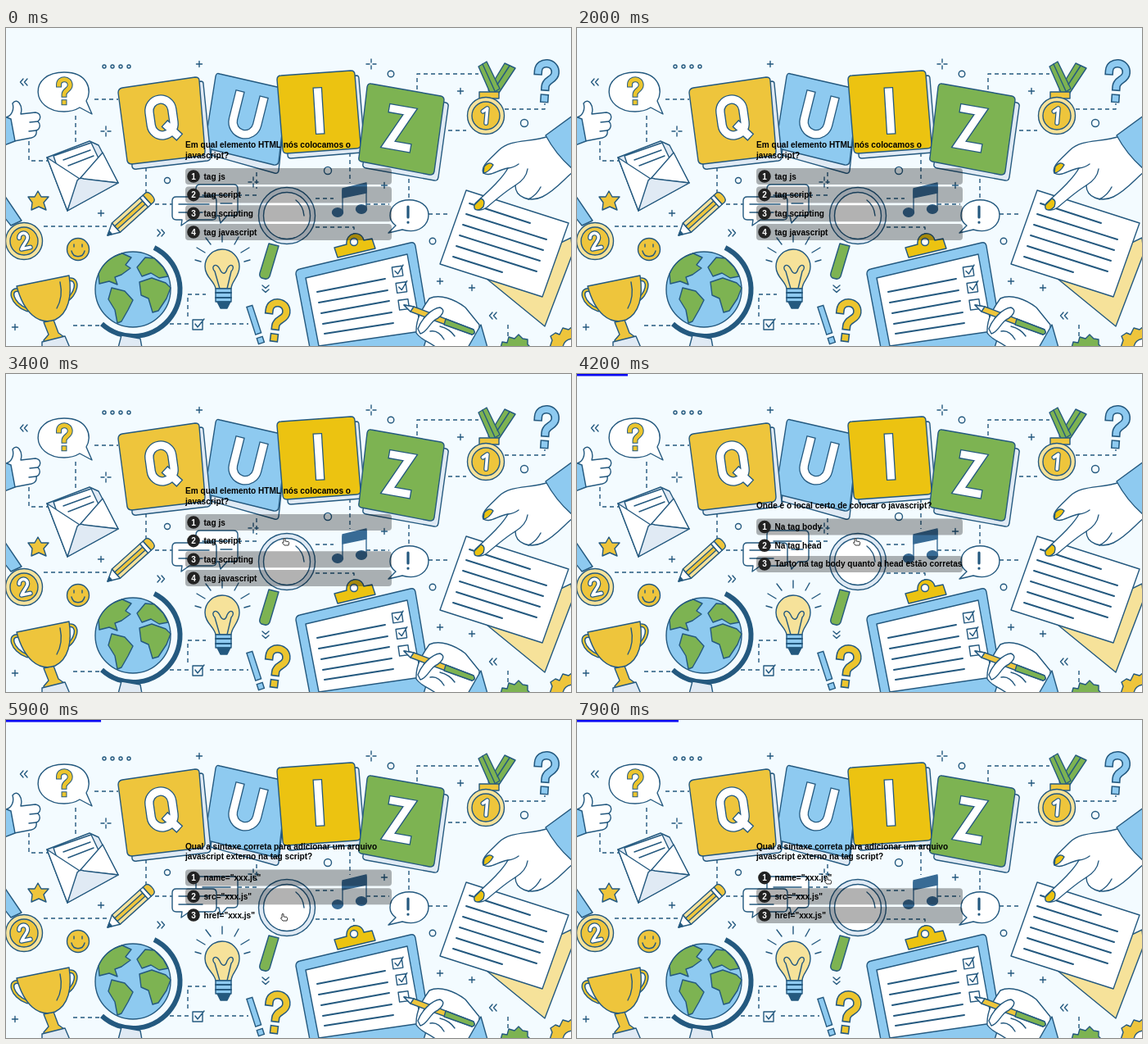
An HTML page that plays this animation: 690x388 px, repeating every 8000 ms.

```html
<!DOCTYPE html>
<html lang="pt">
<head>
<meta charset="utf-8">
<title>Quiz</title>
<style>
html, body { margin: 0; width: 100%; height: 100%; overflow: hidden; background: #f3fbff; }
svg { display: block; width: 690px; height: 388px; overflow: hidden; }
.art { fill: none; stroke: #24597f; stroke-width: 1.4; stroke-linejoin: round; stroke-linecap: round; }
.y { fill: #eec53c; } .p { fill: #f6e29a; } .b { fill: #8ecaf0; }
.g { fill: #7db352; } .w { fill: #fff; } .s { fill: #e0eaf4; }
.k { fill: #24597f; }
.gold { fill: #ecc311; }
.dash { stroke-dasharray: 5 4; stroke-linecap: butt; }
.rule { stroke-width: 1.9; }
.in { stroke: #fff; } .in.yel { stroke: #ecc52e; } .in.blu { stroke: #8ecaf0; }
.letter use, .mark use { stroke-linecap: square; stroke-linejoin: miter; }
.letter use { stroke-width: 11.6; } .letter .in { stroke-width: 9; }
.mark use { stroke-width: 9.6; } .mark .in { stroke-width: 6.8; }
.digit { stroke-width: 6; } .digit.in { stroke-width: 3.6; }
.quiz { font: bold 10.08px "Liberation Sans", Arial, sans-serif; }
.quiz rect { width: 252px; height: 20px; rx: 4px; fill: #000; fill-opacity: .3; animation: 8s step-end infinite; }
.quiz circle { cx: 10px; cy: 10px; r: 7.8px; fill: #222; }
.n { fill: #fff; text-anchor: middle; }
.quiz > g { animation: 8s step-end infinite; }
#q1 { animation-name: q1; } #q2 { animation-name: q2; } #q3 { animation-name: q3; }
#bar { fill: #0808f4; transform-origin: 0 0; animation: bar 8s infinite; }
#hand { animation: hand 8s linear infinite; }
@keyframes q1 { 0% { visibility: visible } 44.375%, 100% { visibility: hidden } }
@keyframes q2 { 0% { visibility: hidden } 44.375% { visibility: visible } 69.375%, 100% { visibility: hidden } }
@keyframes q3 { 0% { visibility: hidden } 69.375%, 100% { visibility: visible } }
@keyframes bar {
  0%, 44.375% { transform: scaleX(0); animation-timing-function: ease }
  51.875%, 69.375% { transform: scaleX(.5); animation-timing-function: ease }
  76.875%, 100% { transform: scaleX(1) }
}
@keyframes hand {
  0%, 36.25% { transform: translate(400px, 392px) }
  41.25%, 55.625% { transform: translate(340px, 200px) }
  57.5%, 92.5% { transform: translate(338px, 236px) }
  96.25%, 100% { transform: translate(305px, 191px) }
}
/* rows turn clear while the pointer is over them */
@keyframes q1r4 { 39.69% { fill-opacity: 0 } 40.19% { fill-opacity: .3 } }
@keyframes q1r3 { 40.19% { fill-opacity: 0 } 40.88% { fill-opacity: .3 } }
@keyframes q1r2 { 40.88%, 100% { fill-opacity: 0 } }
@keyframes q2r2 { 0% { fill-opacity: 0 } 56.625%, 100% { fill-opacity: .3 } }
@keyframes q2r3 { 56.625%, 100% { fill-opacity: 0 } }
@keyframes q3r3 { 0% { fill-opacity: 0 } 93.25%, 100% { fill-opacity: .3 } }
@keyframes q3r2 { 93.25% { fill-opacity: 0 } 95.125%, 100% { fill-opacity: .3 } }
@keyframes q3r1 { 95.125%, 100% { fill-opacity: 0 } }
</style>
</head>
<body>
<svg viewBox="0 0 690 388">
<defs>
  <path id="ask" d="M-9-11C-9-23 10-23 10-10C10-2 0-2 0 6M0 19v.1"/>
  <path id="Q" d="M-14-8A14 14 0 0 1 14-8V8A14 14 0 0 1-14 8ZM6 12L15 23"/>
  <path id="U" d="M-15-22V8A15 15 0 0 0 15 8V-22"/>
  <path id="I" d="M0-23V23"/>
  <path id="Z" d="M-11-22H10L-10 22H13"/>
  <path id="plus" d="M-3.5 0h7M0-3.5v7"/>
  <path id="spark" d="M-6 0h4M2 0h4M0-6v4M0 2v4"/>
  <path id="chev" d="M0-4L-3.5 0L0 4M5-4L1.5 0L5 4"/>
  <path id="tick" d="M-6-6H6V6H-6ZM-3-1L0 3L8-7"/>
  <path id="one" d="M-4-5L1-9V9"/>
  <path id="two" d="M-5-5C-4-12 7-11 5-3C4 1-2 4-5 9H6"/>
</defs>

<g class="art">
  <!-- connectors -->
  <path class="dash" d="M108 87H137M85 107V142M28 138V162H56M171 170V204M502 84V56H577M540 125H562M609 99H658V92
    M46 242H124M182 215H203M222 352V325H244M82 363H114M283 204H308M378 208H400M378 243H425V252M440 215H468
    M492 184V208M516 227H541M249 361H296M200 361H226M306 176V196M420 152V189M613 362V378"/>
  <g>
    <circle cx="120" cy="47" r="2"/><circle cx="130" cy="47" r="2"/><circle cx="140" cy="47" r="2"/><circle cx="150" cy="47" r="2"/>
    <circle cx="470" cy="56" r="3.8"/><circle cx="633" cy="116" r="4.5"/><circle cx="393" cy="174" r="4.5"/>
    <circle cx="197" cy="186" r="3.5"/><circle cx="521" cy="260" r="3.8"/>
    <use href="#plus" x="236" y="44"/><use href="#plus" x="555" y="77"/><use href="#plus" x="116" y="226"/>
    <use href="#plus" x="462" y="192"/><use href="#plus" x="530" y="309"/><use href="#plus" x="569" y="317"/><use href="#plus" x="11" y="365"/>
    <use href="#spark" x="446" y="44"/><use href="#spark" x="122" y="126"/><use href="#spark" x="302" y="188"/>
    <use href="#chev" x="21" y="66"/><use href="#chev" x="594" y="351"/>
    <use href="#chev" transform="translate(190 250) rotate(180)"/><use href="#chev" transform="translate(317 319) rotate(-90)"/>
  </g>

  <!-- letter tiles -->
  <path class="s" d="M262 61L343 81L333 174Q332 178 328 177L250 155Z"/>
  <path class="b" d="M261 56Q257 54 256 59L243 141Q242 146 246 147L327 167Q332 168 333 163L343 78Q343 75 340 74Z"/>
  <g class="letter" transform="translate(294 107) rotate(14)"><use href="#U"/><use href="#U" class="in"/></g>
  <path class="s" d="M150 80L238 65Q241 65 241 68L250 157Q250 161 246 162L160 172Q155 173 154 169Z"/>
  <path class="y" d="M142 73L231 60Q236 60 236 64L243 150Q243 155 239 156L154 166Q149 166 148 162L137 79Q137 74 142 73Z"/>
  <g class="letter" transform="translate(190 109) rotate(-8)"><use href="#Q"/><use href="#Q" class="in"/></g>
  <path class="s" d="M342 64L428 58Q431 58 431 62L438 148Q438 152 434 152L348 159Q344 159 344 155Z"/>
  <path class="gold" d="M336 58L421 52Q426 52 426 57L433 142Q433 147 428 147L343 153Q338 153 338 148L331 63Q331 58 336 58Z"/>
  <g class="letter" transform="translate(382 101) rotate(-3.5)"><use href="#I"/><use href="#I" class="in"/></g>
  <path class="s" d="M447 73L537 91Q541 92 540 96L528 182Q527 187 523 186L440 171Q435 170 436 166Z"/>
  <path class="g" d="M446 68L531 83Q535 84 535 88L523 175Q522 180 517 179L434 163Q430 162 431 158L441 72Q442 67 446 68Z"/>
  <g class="letter" transform="translate(480 122) rotate(10)"><use href="#Z"/><use href="#Z" class="in"/></g>

  <!-- top left -->
  <path class="w" d="M90 97L105 105L98 89C106 76 100 54 71 54C27 54 30 102 71 102Q82 102 90 97Z"/>
  <g class="mark" transform="translate(71 77) scale(.72)"><use href="#ask"/><use href="#ask" class="in yel"/></g>
  <path class="w" d="M0 109C8 107 10 98 8 92C14 84 21 95 18 105L36 103C43 104 43 111 39 114C43 118 41 124 37 125C38 131 35 133 31 134L10 138L0 140Z"/>
  <path d="M39 114L29 115M37 125L28 126"/>
  <path class="b" d="M-2 108L6 111L11 138L-2 143Z"/>
  <path class="s" d="M50 158L102 138L113 143L137 189L75 223Z"/>
  <path class="w" d="M58 156L104 140L122 178L90 190L62 168Z"/>
  <path class="w" d="M50 158L90 184L75 223ZM118 152L137 189L90 184Z"/>
  <path class="s" d="M75 223L87 186Q90 182 95 184L137 189Z"/>
  <path d="M70 161L103 149M76 168L107 156"/>
  <path class="y" d="M39 199L43 206L52 206L46 213L49 222L40 218L31 222L32 213L27 206L35 206Z"/>
  <g transform="translate(124 253) rotate(-42)">
    <path class="w" d="M0 0L14-7.5V7.5Z"/><path class="p" d="M14-7.5H60V7.5H14Z"/>
    <path class="y" d="M14-2.5H60V2.5H14Z"/><path class="w" d="M60-7.5H65V7.5H60Z"/><path class="y" d="M65-7.5H69Q73-7 73 0T69 7.5H65Z"/><path class="k" d="M0 0L5-2.5V2.5Z"/>
  </g>

  <!-- bottom left -->
  <path class="b" d="M-2 204L19 235L6 241L-2 231Z"/>
  <circle class="p" cx="22" cy="260" r="22.5"/><circle class="y" cx="22" cy="260" r="17"/>
  <g transform="translate(22 260) rotate(-12)"><use href="#two" class="digit"/><use href="#two" class="digit in"/></g>
  <circle class="y" cx="88" cy="270" r="13.5"/><path d="M80 272C82 281 94 281 96 272M83 264v3M93 264v3"/>
  <path d="M17 320C2 316 6 337 26 344M76 307C91 304 86 327 72 333" stroke-width="5"/>
  <path class="in yel" d="M17 320C2 316 6 337 26 344M76 307C91 304 86 327 72 333" stroke-width="2.2"/>
  <path class="y" d="M46 359L58 356L64 372L71 377L74 390H48L46 381L52 374Z"/>
  <path class="s" d="M44 383L72 376L78 390H44Z"/>
  <path class="y" d="M13 315L77 302C81 328 76 348 60 356C40 363 22 348 13 315Z"/>
  <path d="M66 310Q70 328 62 342"/>
  <path d="M181 268A57 57 0 1 1 117 361" stroke-width="6" stroke-linecap="butt"/>
  <path class="s" d="M137 390L141 375L164 379L166 390Z"/>
  <circle class="b" cx="155" cy="319" r="46"/>
  <path class="g" d="M113 300C118 288 128 279 142 275L153 280L146 289L152 293L141 301L133 304L136 313L126 309L114 312ZM129 317L145 321L155 332L149 344L141 358L136 360L133 344L125 331ZM160 292L170 280L181 281L192 292L198 303L187 305L177 299L166 303ZM163 310L178 305L195 311L201 317L196 330L186 345L179 347L174 330L165 326Z"/>
  <use href="#tick" x="234" y="362"/>

  <!-- centre -->
  <path class="w" d="M237 191H278Q283 191 283 196V224Q283 229 278 229H270L262 238L260 229H237Q232 229 232 224V196Q232 191 237 191Z"/>
  <path class="w" d="M208 206H252Q257 206 257 211V228Q257 234 252 234H224L214 241L215 234H208Q203 234 203 229V211Q203 206 208 206Z"/>
  <path d="M240 204H274M262 214H276M211 215H248M211 225H240"/>
  <path class="p" d="M256 318C255 309 243 304 243 291A21 21 0 0 1 285 291C285 304 275 309 275 318Z"/>
  <path d="M261 318L255 297C249 291 257 285 261 294C264 301 268 301 270 294C274 285 281 291 275 297L270 318"/>
  <path class="b" d="M256 318H275V334H256Z"/><path d="M256 323H275M256 329H275" stroke-width="2"/><path class="k" d="M258 334H274L270 342H262Z"/>
  <path d="M231 283L238 285M233 268L243 274M244 256L250 264M264 252V261M284 255L279 264M297 268L287 274M298 283L291 285"/>
  <path class="g" d="M321 263L333 266L322 303Q320 307 316 306L312 305Q309 303 310 299Z"/>
  <circle class="s" cx="343" cy="229" r="34.5"/><circle class="w" cx="343" cy="229" r="28.5"/>
  <path d="M354 210Q363 217 364 229"/>
  <g style="stroke:#386b95;fill:#386b95">
    <path d="M411 196L440 189V201L411 207Z"/><path d="M411 198V225M440 191V221"/>
    <ellipse cx="405" cy="225" rx="6.5" ry="5.3"/><ellipse cx="434" cy="221" rx="6.5" ry="5.3"/>
  </g>
  <path class="w" d="M476 241L467 250L484 246C504 252 516 240 516 228C516 204 469 203 469 229Q469 236 476 241Z"/>
  <path d="M491 218L491 231M491 237v.2" stroke-width="3.2"/>
  <g class="mark" transform="translate(304 360) rotate(-18)"><path id="bang" d="M0-18V10M0 22v.1" style="stroke-width:8.6;stroke-linecap:square"/><path class="in blu" d="M0-18V10M0 22v.1" style="stroke-width:5.8;stroke-linecap:square"/></g>
  <g class="mark" transform="translate(330 357) rotate(7) scale(1.1)"><use href="#ask"/><use href="#ask" class="in yel"/></g>

  <!-- clipboard -->
  <path class="b" d="M359 294L494 262Q499 261 500 266L517 367L510 390H371L354 300Q354 295 359 294Z"/>
  <path class="w" d="M366 305L490 276L507 370L382 388Z"/>
  <path class="gold" d="M401 268L416 264C414 249 434 246 437 259L447 257L451 269L405 280Z"/><circle class="w" cx="425" cy="261" r="4.5"/>
  <path class="rule" d="M380 322L463 306M382 335L466 320M385 348L468 333M387 361L471 347M389 373L473 360"/>
  <g transform="rotate(-8 480 318)"><use href="#tick" x="481" y="297"/><use href="#tick" x="483" y="317"/><path d="M477 332h12v12h-12z"/></g>
  <path class="w" d="M501 372C500 355 509 341 517 330C530 324 548 331 561 341L578 362V390H526C515 382 506 380 501 372Z"/>
  <path class="y" d="M486 338L498 340L571 368Q574 373 569 374L494 346Z"/><path class="g" d="M537 355L571 368Q574 373 569 374L535 362Z"/><path class="w" d="M486 338L498 340L494 346Z"/>
  <path class="w" d="M503 367C507 355 520 342 530 341C538 344 532 352 524 356C517 361 514 371 506 373Z"/>
  <path d="M530 364Q542 367 548 376M518 370Q528 368 535 380"/>
  <path class="b" d="M564 390L580 362L588 390Z"/>

  <!-- right -->
  <path class="p" d="M690 256L692 275L658 364L587 306Z"/>
  <path class="w" d="M562 198L687 238L655 328L530 288Z"/>
  <path class="rule" d="M566 214L640 238M562 227L660 258M558 240L656 271M554 253L652 284M550 266L648 297M546 279L606 298"/>
  <path class="w" d="M663 132C640 140 616 135 602 149C590 161 579 169 583 177C591 182 600 173 613 171C606 184 588 200 573 214C570 221 578 225 587 219C601 207 612 198 622 192C622 207 640 213 655 206C670 199 682 184 692 176V116Z"/>
  <path d="M622 192C632 186 636 179 637 172M638 209Q648 204 653 194M613 171Q621 170 626 166"/>
  <path class="gold" d="M572 216L580 208Q586 210 583 218C578 224 570 223 572 216ZM583 177L584 169Q590 162 595 167Q590 176 583 177Z"/>
  <path class="b" d="M659 131L692 107V172Q672 155 659 131Z"/>
  <g class="mark" transform="translate(659 65) rotate(4) scale(1.1)"><use href="#ask"/><use href="#ask" class="in blu"/></g>
  <path class="g" d="M609 43L622 49L600 82L589 76Z"/><path class="g" d="M577 47L587 41L603 74L592 81Z"/>
  <path d="M582 44L597 77M615 46L600 69"/><path class="y" d="M578 78H602V86H578Z"/>
  <circle class="p" cx="586" cy="107" r="22.5"/><circle class="y" cx="586" cy="107" r="17"/>
  <g transform="translate(586 107) rotate(5)"><use href="#one" class="digit"/><use href="#one" class="digit in"/></g>
  <path class="g" d="M604 390L606 383L612 384L614 377L621 379L626 374L631 379L637 380V386L641 390Z"/>
  <path class="y" d="M664 390L667 381L665 376L671 372L676 374L680 366L687 368L692 364V390Z"/><path class="w" d="M680 390Q681 380 692 379V390Z"/>
</g>

<rect id="bar" width="124" height="2.5"/>

<g class="quiz">
  <g id="q1">
    <text x="219" y="146">Em qual elemento HTML nós colocamos o</text><text x="219" y="158.5">javascript?</text>
    <g transform="translate(219 171)"><rect/><circle/><text class="n" x="10" y="13.6">1</text><text x="22.5" y="13.6">tag js</text></g>
    <g transform="translate(219 193.6)"><rect style="animation-name:q1r2"/><circle/><text class="n" x="10" y="13.6">2</text><text x="22.5" y="13.6">tag script</text></g>
    <g transform="translate(219 216.3)"><rect style="animation-name:q1r3"/><circle/><text class="n" x="10" y="13.6">3</text><text x="22.5" y="13.6">tag scripting</text></g>
    <g transform="translate(219 239)"><rect style="animation-name:q1r4"/><circle/><text class="n" x="10" y="13.6">4</text><text x="22.5" y="13.6">tag javascript</text></g>
  </g>
  <g id="q2">
    <text x="219" y="163.5">Onde é o local certo de colocar o javascript?</text>
    <g transform="translate(219 176.5)"><rect/><circle/><text class="n" x="10" y="13.6">1</text><text x="22.5" y="13.6">Na tag body</text></g>
    <g transform="translate(219 199.2)"><rect style="animation-name:q2r2"/><circle/><text class="n" x="10" y="13.6">2</text><text x="22.5" y="13.6">Na tag head</text></g>
    <g transform="translate(219 221.9)"><rect style="animation-name:q2r3"/><circle/><text class="n" x="10" y="13.6">3</text><text x="22.5" y="13.6">Tanto na tag body quanto a head estão corretas</text></g>
  </g>
  <g id="q3">
    <text x="219" y="157.5">Qual a sintaxe correta para adicionar um arquivo</text><text x="219" y="170">javascript externo na tag script?</text>
    <g transform="translate(219 182.6)"><rect style="animation-name:q3r1"/><circle/><text class="n" x="10" y="13.6">1</text><text x="22.5" y="13.6">name="xxx.js"</text></g>
    <g transform="translate(219 205.3)"><rect style="animation-name:q3r2"/><circle/><text class="n" x="10" y="13.6">2</text><text x="22.5" y="13.6">src="xxx.js"</text></g>
    <g transform="translate(219 228)"><rect style="animation-name:q3r3"/><circle/><text class="n" x="10" y="13.6">3</text><text x="22.5" y="13.6">href="xxx.js"</text></g>
  </g>
</g>

<path id="hand" fill="#fff" stroke="#222" stroke-width=".9" stroke-linejoin="round" d="M-1 1Q0-.5 1 1V4L5 4.5Q6 5 5.500 7L5 9H0L-2.500 6Q-2 4.500-1 5.500Z"/>
</svg>
</body>
</html>
```
